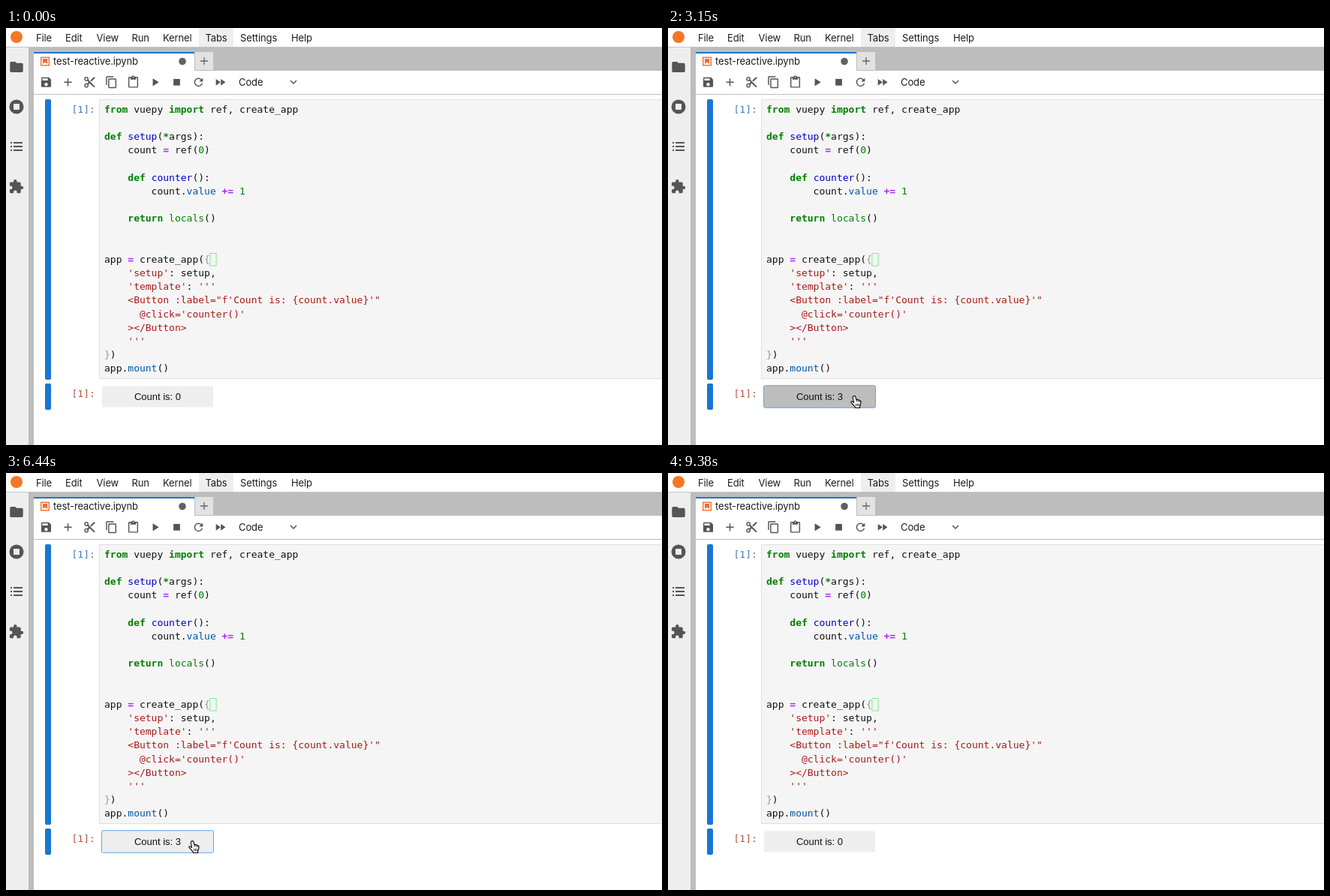
These frames come from a looping animation (874 px wide and 556 px high, 9450 ms). An HTML page:

```html
<!DOCTYPE html>
<html lang="en">
<head>
<meta charset="utf-8">
<title>Reactive notebook</title>
<style>
html, body { margin: 0; width: 100%; height: 100%; overflow: hidden; background: #fff; }
svg { display: block; width: 874px; height: 556px; }
.ui { font: 13px Inter, Roboto, sans-serif; letter-spacing: -.12px; fill: #1c1c1c; }
.code { font: 13px "DejaVu Sans Mono", monospace; white-space: pre; fill: #111; }
.btn { font: 13px "Liberation Sans", Arial, sans-serif; fill: #111; text-anchor: middle; }
.k { fill: #008000; font-weight: bold; }
.b, .n { fill: #008000; }
.o { fill: #a2f; font-weight: bold; }
.d { fill: #00c; }
.p { fill: #05a; }
.s { fill: #a81a1a; }
.m { fill: #998; }
.icon { fill: #555; }
</style>
</head>
<body>
<svg viewBox="0 0 874 556" xmlns="http://www.w3.org/2000/svg">
  <rect width="874" height="556" fill="#fff"/>
  <rect x="257" width="46" height="25" fill="#eee"/>
  <circle cx="14" cy="12" r="8" fill="#f37726"/>
  <g id="menu" class="ui"></g>

  <rect y="25" width="30" height="531" fill="#eee"/>
  <rect x="30" y="25" width="7" height="531" fill="#bdbdbd"/>
  <rect x="37" y="25" width="837" height="32" fill="#bdbdbd"/>
  <rect y="25" width="874" height="1" fill="#c4c4c4"/>
  <rect x="37" y="32" width="214" height="25" fill="#fff"/>
  <rect x="37" y="32" width="214" height="2" fill="#1976d2"/>
  <rect x="252" y="32" width="24" height="24" fill="#e2e2e2"/>
  <path d="M259 44h10M264 39v10" stroke="#666" stroke-width="1.3"/>
  <rect x="46.7" y="39.2" width="10.6" height="10.6" fill="#fff" stroke="#ef6c2f" stroke-width="1.4"/>
  <path d="M49 41h6v7l-3-2.6-3 2.6z" fill="#ef6c2f"/>
  <text class="ui" x="63" y="49.3">test-reactive.ipynb</text>
  <circle cx="235" cy="44.5" r="4.8" fill="#616161"/>

  <g id="icons" class="icon"></g>
  <circle cx="14" cy="105" r="9.5" class="icon"/>
  <rect x="10" y="101" width="8" height="8" rx="1" fill="#eee"/>
  <path d="M6 153h2m2 0h12M6 158h2m2 0h12M6 163h2m2 0h12" stroke="#555" stroke-width="1.8"/>
  <text class="ui" x="310" y="77.2">Code</text>
  <path d="M379 70l4 4 4-4" fill="none" stroke="#555" stroke-width="1.5"/>
  <rect x="37" y="88" width="837" height="1" fill="#bdbdbd"/>

  <path id="frame" d="M875 89.5H46.5V515H875" fill="none" stroke="#4c6198"/>
  <rect x="52" y="95" width="8" height="374" rx="2" fill="#1976d2"/>
  <rect x="52" y="474" width="8" height="35" rx="2" fill="#1976d2"/>
  <rect x="124.5" y="95.5" width="760" height="372" fill="#f5f5f5" stroke="#e0e0e0"/>
  <text class="code" x="87.5" y="112.8" style="fill:#4878b4">[1]:</text>
  <text class="code" x="87.5" y="492.3" style="fill:#b5553f">[1]:</text>
  <g id="code"></g>
  <rect x="271.9" y="300.5" width="8.2" height="16.5" fill="none" stroke="#7df08a"/>

  <rect id="button"/>
  <text id="label" class="btn" x="202" y="496"></text>

  <circle id="ring" r="21.3" fill="none" stroke="#000" stroke-width="1.4"/>
  <path id="arrow" d="M0 0V14.4L3.3 11.4 5.6 16.4 7.8 15.4 5.5 10.6H10z" fill="#000" stroke="#fff" stroke-width=".9"/>
  <g id="hand" stroke="#000" stroke-width="1.1" stroke-linejoin="round">
    <path fill="#fff" d="M-1.2.5C-.2-.7 1.6-.1 1.9 1.2L3 5.2C3.6 4.4 5 4.5 5.4 5.5 6 5 7.2 5.2 7.5 6.2 8.3 6 9 6.6 9 7.6 9 10 8.6 12 7.6 13.6V15.8H1.4L1.2 14.4C-.2 13-2 10.5-3.8 9-4.8 7.9-3.5 6.6-2.2 7.4L-.4 8.8-1.6 2.6C-1.8 1.8-1.7 1-1.2.5z"/>
    <path fill="none" stroke-width=".8" d="M3 5.2l.4 2.6M5.4 5.5l.3 2.5M7.5 6.2v2M2.6 10v3.4M4.5 10v3.4M6.3 10v3.4"/>
  </g>
</svg>
<script>
const $ = id => document.getElementById(id);
const STEP = 70, STEPS = 135;

const menu = { File: 40, Edit: 79, View: 120.5, Run: 167.5, Kernel: 209, Tabs: 265.5, Settings: 312, Help: 380 };
$('menu').innerHTML = Object.entries(menu)
  .map(([name, x]) => `<text x="${x}" y="17.5">${name}</text>`).join('');

// 24-unit icon paths, placed by their centre
const icon = (d, x, y, scale) =>
  `<path d="${d}" transform="translate(${x} ${y}) scale(${scale}) translate(-12 -12)"/>`;
const tools = [
  'M17 3H5c-1.1 0-2 .9-2 2v14c0 1.1.9 2 2 2h14c1.1 0 2-.9 2-2V7l-4-4zm-5 16c-1.7 0-3-1.3-3-3s1.3-3 3-3 3 1.3 3 3-1.3 3-3 3zm3-10H5V5h10v4z',
  'M19 13h-6v6h-2v-6H5v-2h6V5h2v6h6v2z',
  'M9.6 7.6c.3-.5.4-1 .4-1.6 0-2.2-1.8-4-4-4S2 3.8 2 6s1.8 4 4 4c.6 0 1.1-.1 1.6-.4L10 12l-2.4 2.4C7.1 14.1 6.6 14 6 14c-2.2 0-4 1.8-4 4s1.8 4 4 4 4-1.8 4-4c0-.6-.1-1.1-.4-1.6L12 14l7 7h3v-1zM6 8a2 2 0 1 1 0-4 2 2 0 0 1 0 4zm0 12a2 2 0 1 1 0-4 2 2 0 0 1 0 4zM19 3l-6 6 2 2 7-7V3z',
  'M16 1H4c-1.1 0-2 .9-2 2v14h2V3h12V1zm3 4H8c-1.1 0-2 .9-2 2v14c0 1.1.9 2 2 2h11c1.1 0 2-.9 2-2V7c0-1.1-.9-2-2-2zm0 16H8V7h11v14z',
  'M19 2h-4.2C14.4.8 13.3 0 12 0S9.6.8 9.2 2H5c-1.1 0-2 .9-2 2v16c0 1.1.9 2 2 2h14c1.1 0 2-.9 2-2V4c0-1.1-.9-2-2-2zm-7 0a1 1 0 1 1 0 2 1 1 0 0 1 0-2zm7 18H5V4h2v3h10V4h2v16z',
  'M8 5v14l11-7z',
  'M6 6h12v12H6z',
  'M17.65 6.35A8 8 0 1 0 19.73 14h-2.08A6 6 0 1 1 16.2 7.8L13 11h7V4z',
  'M4 18l8.5-6L4 6v12zm9-12v12l8.5-6L13 6z'
];
const folder = 'M10 4H4c-1.1 0-2 .9-2 2v12c0 1.1.9 2 2 2h16c1.1 0 2-.9 2-2V8c0-1.1-.9-2-2-2h-8l-2-2z';
const puzzle = 'M20.5 11H19V7c0-1.1-.9-2-2-2h-4V3.5a2.5 2.5 0 0 0-5 0V5H4c-1.1 0-2 .9-2 2v3.8h1.5a2.7 2.7 0 0 1 0 5.4H2V20c0 1.1.9 2 2 2h3.8v-1.5a2.7 2.7 0 0 1 5.4 0V22H17c1.1 0 2-.9 2-2v-4h1.5a2.5 2.5 0 0 0 0-5z';
$('icons').innerHTML = tools.map((d, i) => icon(d, 53.5 + 29 * i, 72.3, .73)).join('')
  + icon(folder, 14, 52, .87) + icon(puzzle, 13.6, 211.5, .87);

// ~x...~ marks a span of class x
const source = `~kfrom~ vuepy ~kimport~ ref, create_app

~kdef~ ~dsetup~(~k*~args):
    count ~o=~ ref(~n0~)

    ~kdef~ ~dcounter~():
        count.~pvalue~ ~o+=~ ~n1~

    ~kreturn~ ~blocals~()


app ~o=~ create_app(~m{~
    ~s'setup'~: setup,
    ~s'template'~: ~s'''~
    ~s<Button :label="f'Count is: {count.value}'"~
    ~s  @click='counter()'~
    ~s></Button>~
    ~s'''~
~m}~)
app.~pmount~()`;
const paint = line => line.replace(/&/g, '&amp;').replace(/</g, '&lt;').replace(/>/g, '&gt;')
  .replace(/~(\w)(.*?)~/g, '<tspan class="$1">$2</tspan>');
$('code').innerHTML = source.split('\n')
  .map((line, i) => `<text class="code" x="131" y="${112.8 + 18.18 * i}">${paint(line)}</text>`).join('');

// pointer path: time, x, y
const path = [
  [350, 396, 549], [490, 368, 529], [630, 338, 511], [770, 318, 502], [910, 312.5, 499],
  [1190, 312.5, 499], [1400, 285, 497], [1610, 255, 492], [1750, 249, 491.2],
  [2380, 249, 491.2], [2450, 248, 490.7], [3850, 248, 490.7],
  [3920, 262, 502], [3990, 310, 522], [4060, 372, 546], [4130, 436.5, 566]
];
const presses = [[2030, 2240], [2450, 2660], [2800, 2870], [3150, 3290], [3500, 3640]];
const rings = [[910, 1120], [2030, 2240], [2450, 2660], [4620, 4760]];
const within = (t, spans) => spans.some(([a, b]) => t >= a && t < b);

function pointer(t) {
  const i = path.findIndex(p => p[0] > t);
  if (i < 0) return path[path.length - 1].slice(1);
  if (!i) return [900, 600];
  const [a, x, y] = path[i - 1], [b, u, v] = path[i], f = (t - a) / (b - a);
  return [x + (u - x) * f, y + (v - y) * f];
}

const set = (id, attrs) => {
  for (const name in attrs) $(id).setAttribute(name, attrs[name]);
};
const show = (id, on) => set(id, { visibility: on ? 'visible' : 'hidden' });

// The clip runs forward to its middle, then backward
function draw(ms) {
  const i = Math.floor(ms / STEP) % STEPS;
  const t = Math.min(i, STEPS - 1 - i) * STEP;
  const focus = t >= 2030;
  const [x, y] = pointer(t);
  const over = x < 276 && y < 506;

  set('button', focus
    ? { x: 127.5, y: 476.7, width: 149, height: 29.6, rx: 2, stroke: '#64a5e0' }
    : { x: 128, y: 477.5, width: 148, height: 28, rx: 1.5, stroke: 'none' });
  set('button', { fill: within(t, presses) ? '#bdbdbd' : '#eee' });
  $('label').textContent = 'Count is: ' + presses.filter(p => t >= p[1]).length;
  show('frame', t >= 910 && !focus);

  show('ring', within(t, rings));
  set('ring', { cx: x + (over ? 7 : 0), cy: y + (over ? 8.5 : 0) });
  show('hand', over);
  show('arrow', !over);
  set(over ? 'hand' : 'arrow', { transform: `translate(${x} ${y})` });
}

const start = performance.now();
function tick() {
  draw(performance.now() - start);
  requestAnimationFrame(tick);
}
draw(0);
tick();
</script>
</body>
</html>
```
